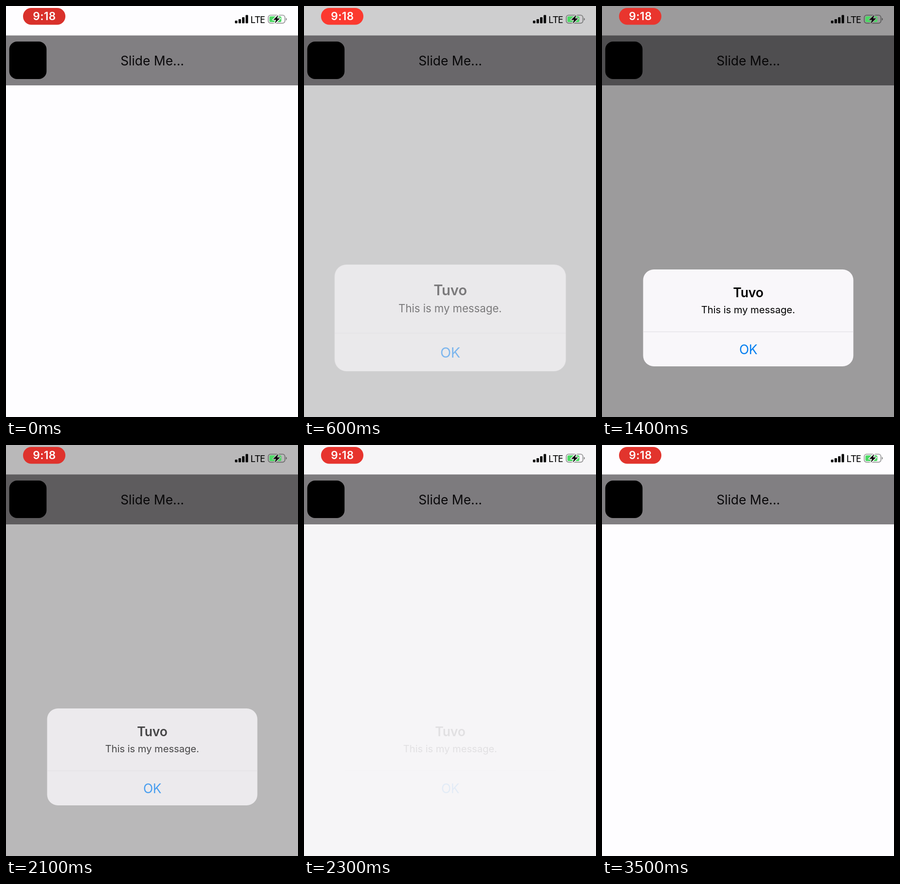
Write an HTML page that moves like this. It is 600 px wide and 844 px high and loops after 3600 ms.

```html
<!DOCTYPE html>
<html lang="en">
<head>
<meta charset="utf-8">
<title>Slide to confirm</title>
<style>
  html, body { margin: 0; width: 100%; height: 100%; overflow: hidden; background: #fefdff; }
  svg { display: block; width: 600px; height: 844px; }
  text { font-family: Inter, "Liberation Sans", sans-serif; text-anchor: middle; }

  .label { font-size: 26.4px; fill: #09080a; }
  .title { font-size: 26.6px; font-weight: 600; letter-spacing: -.2px; }
  .message { font-size: 20.2px; letter-spacing: -.05px; }
  .action { font-size: 26.4px; letter-spacing: -.4px; fill: #067ff0; }
  .clock { font-size: 22.6px; font-weight: 600; letter-spacing: .4px; fill: #fff; }
  .network { font-family: "Noto Sans", "Open Sans", sans-serif; font-size: 20px; letter-spacing: -.8px; text-anchor: start; }

  .knob, .dim, .alert, .panel, .content { animation: 3600ms step-end infinite; }
  .knob { animation-name: slide; }
  .dim, .content { animation-name: fade; }
  .panel { animation-name: panel; }
  .alert { animation-name: settle; transform-origin: 300.5px 640.5px; }
  .pill { animation: pulse 3600ms infinite; }

  @keyframes slide {
    0% { transform: translateX(0); }
    2.77% { transform: translateX(40px); }
    5.55% { transform: translateX(150px); }
    8.33% { transform: translateX(305px); }
    11.11% { transform: translateX(450px); }
    13.88% { transform: translateX(515px); }
    16.66%, 100% { transform: translateX(0); }
  }
  @keyframes fade {
    0% { opacity: 0; }
    16.66% { opacity: .48; }
    19.44% { opacity: .92; }
    22.22% { opacity: .98; }
    25% { opacity: 1; }
    58.33% { opacity: .7; }
    61.11% { opacity: .31; }
    63.88% { opacity: .08; }
    66.66%, 100% { opacity: 0; }
  }
  @keyframes panel {
    0% { opacity: 0; }
    16.66% { opacity: .65; }
    19.44% { opacity: .98; }
    22.22% { opacity: 1; }
    58.33% { opacity: .8; }
    61.11% { opacity: .5; }
    63.88% { opacity: .15; }
    66.66%, 100% { opacity: 0; }
  }
  @keyframes settle {
    0% { transform: scale(1.1); }
    19.44% { transform: scale(1.0175); }
    22.22% { transform: scale(1.004); }
    25%, 100% { transform: none; }
  }
  /* Recording indicator: ten colour steps per second */
  @keyframes pulse {
    0% { fill: #d9312b; animation-timing-function: steps(5); }
    13.88% { fill: #fb382f; animation-timing-function: steps(3); }
    22.22% { fill: #ff3b30; animation-timing-function: steps(6); }
    38.88% { fill: #e9352e; animation-timing-function: steps(4); }
    50% { fill: #d5302a; animation-timing-function: steps(4); }
    61.11% { fill: #e2332d; animation-timing-function: steps(6); }
    77.77% { fill: #ff3a30; animation-timing-function: steps(7); }
    97.22% { fill: #e2342d; animation-timing-function: step-end; }
    100% { fill: #d9312b; }
  }
</style>
</head>
<body>
<svg viewBox="0 0 600 844">
  <defs>
    <path id="bolt" d="M559.5 18.5 549 28.5h6l-3 7.5 11-10.5h-6z"/>
    <mask id="gap" maskUnits="userSpaceOnUse" x="530" y="10" width="60" height="34">
      <rect x="530" y="10" width="60" height="34" fill="#fff"/>
      <use href="#bolt" stroke="#000" stroke-width="3.2" stroke-linejoin="round"/>
    </mask>
  </defs>

  <rect width="600" height="844" fill="#fefdff"/>
  <rect y="60.5" width="600" height="102.5" fill="#817f82"/>
  <text class="label" x="300.5" y="122">Slide Me...</text>
  <rect class="knob" x="6.7" y="73" width="76.6" height="77" rx="16"/>

  <rect class="dim" width="600" height="844" fill-opacity=".39"/>

  <g class="alert">
    <rect class="panel" x="84.5" y="541" width="432" height="199" rx="22" fill="#f9f7fa"/>
    <g class="content">
      <path d="M84.5 669h432" stroke="#dddbdf" stroke-width="1.2"/>
      <text class="title" x="300.5" y="598">Tuvo</text>
      <text class="message" x="300.3" y="630.5">This is my message.</text>
      <text class="action" x="300.5" y="715">OK</text>
    </g>
  </g>

  <rect class="pill" x="35" y="4" width="87" height="34.5" rx="17"/>
  <text class="clock" x="79" y="29.3">9:18</text>

  <rect x="470.5" y="30" width="5" height="5.5" rx="1.2"/>
  <rect x="477.8" y="27" width="5" height="8.5" rx="1.2"/>
  <rect x="485.1" y="23" width="5" height="12.5" rx="1.2"/>
  <rect x="492.4" y="18.5" width="5" height="17" rx="1.2"/>
  <text class="network" x="502" y="35">LTE</text>

  <g mask="url(#gap)">
    <rect x="538.8" y="18.8" width="34.4" height="16.6" rx="5" fill="none" stroke="#000" stroke-opacity=".42" stroke-width="1.6"/>
    <rect x="541.2" y="21.2" width="24.6" height="11.8" rx="2.8" fill="#4cd964"/>
  </g>
  <path d="M575 24.2q2.2 .8 2.2 2.9t-2.2 2.9z" fill-opacity=".45"/>
  <use href="#bolt"/>
</svg>
</body>
</html>
```
